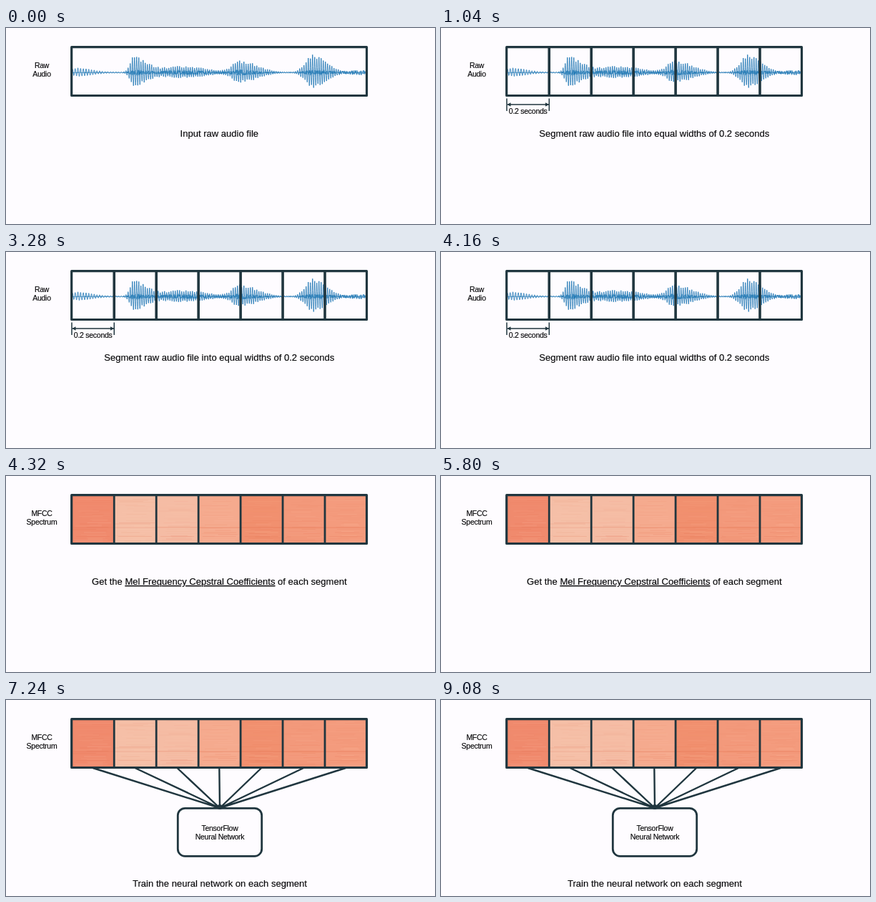
These frames come from a looping animation (600 px wide and 274 px high, 9120 ms). An HTML page:

```html
<!DOCTYPE html>
<html lang="en">
<head>
<meta charset="utf-8">
<title>Audio to neural network</title>
<style>
  html, body { margin: 0; width: 100%; height: 100%; overflow: hidden; background: #fefcff; }
  svg { display: block; width: 600px; height: 274px; }
  text { font-family: "Liberation Sans", Arial, sans-serif; text-anchor: middle; fill: #08080a; stroke: #08080a; stroke-width: .15; }
  .label { font-size: 10.5px; letter-spacing: -.27px; }
  .caption { font-size: 13.05px; }
  .under { text-decoration: underline; }
  .line { fill: none; stroke: #20363f; }
  .wave { fill: none; stroke: #1f77b4; stroke-linejoin: round; }
</style>
</head>
<body>
<svg viewBox="0 0 600 274">
  <g data-from="0" data-to="4320">
    <path id="tone" class="wave" stroke-width=".85"/>
    <path id="hiss" class="wave" stroke-width=".6"/>
    <text class="label" x="50" y="55.5">Raw</text>
    <text class="label" x="50" y="67.5">Audio</text>
  </g>
  <text class="caption" x="298.3" y="152" data-from="0" data-to="1040">Input raw audio file</text>
  <g data-from="1040" data-to="4320">
    <path class="line dividers" stroke-width="3.6"/>
    <path class="line" stroke-width="1.5" d="M92 98.5V116M151.3 98.5V116M93 107H150.5"/>
    <path fill="#20363f" d="M92.5 107l5-2.7v5.4zM151 107l-5-2.7v5.4z"/>
    <text class="label" x="121.7" y="120.3">0.2 seconds</text>
    <text class="caption" x="298.3" y="152">Segment raw audio file into equal widths of 0.2 seconds</text>
  </g>
  <g data-from="4320" data-to="9120">
    <g id="spectrum"></g>
    <path class="line dividers" stroke-width="2.8"/>
    <text class="label" x="50" y="55.5">MFCC</text>
    <text class="label" x="50" y="67.5">Spectrum</text>
  </g>
  <text class="caption" x="298.3" y="152" data-from="4320" data-to="7240">Get the <tspan class="under">Mel Frequency Cepstral Coefficients</tspan> of each segment</text>
  <g data-from="7240" data-to="9120">
    <path id="links" class="line" stroke-width="2.4"/>
    <circle cx="299" cy="149.5" r="3.6" fill="#20363f"/>
    <rect class="line" x="240.3" y="151.3" width="117.4" height="67" rx="10" stroke-width="2.8"/>
    <text class="label" x="299" y="182.5">TensorFlow</text>
    <text class="label" x="299" y="194.5">Neural Network</text>
    <text class="caption" x="299" y="260.5">Train the neural network on each segment</text>
  </g>
  <rect class="line" x="91.7" y="26.7" width="412.8" height="67.8" stroke-width="3.2" stroke-linejoin="round"/>
</svg>
<script>
const LOOP = 9120, LEFT = 92, RIGHT = 504, TOP = 27, BOTTOM = 94;
const COUNT = 7, CELL = 58.95, AXIS = 62.3;
const $ = s => document.querySelector(s);
const $$ = s => [...document.querySelectorAll(s)];

function rng(seed) {
  return () => (seed = (seed * 16807) % 2147483647) / 2147483647;
}

// Each burst of sound is a bell with its own rise and fall.
const BURSTS = [
  { at: 92, rise: 1, fall: 26, size: 6, hiss: 0 },
  { at: 178, rise: 5, fall: 18, size: 22, hiss: 3.2 },
  { at: 243, rise: 24, fall: 38, size: 8, hiss: 3 },
  { at: 326, rise: 9, fall: 24, size: 16, hiss: 3.2 },
  { at: 430, rise: 11, fall: 18, size: 24, hiss: 3.2 },
  { at: 498, rise: 20, fall: 20, size: 1, hiss: 3 }
];

function level(x, key) {
  return BURSTS.reduce((sum, b) => {
    const d = (x - b.at) / (x < b.at ? b.rise : b.fall);
    return sum + b[key] * Math.exp(-d * d / 2);
  }, .6);
}

function trace(id, step, height) {
  const pts = [];
  for (let x = LEFT; x < RIGHT; x += step) {
    pts.push(x.toFixed(2) + " " + (AXIS - height(x)).toFixed(1));
  }
  $(id).setAttribute("d", "M" + pts.join("L"));
}

function drawWave() {
  const rand = rng(41);
  let cycle = -1, gain = 1;
  trace("#tone", .25, x => {
    const turns = (x - LEFT) / (x < 165 ? 3.8 : 3);
    if (Math.floor(turns) !== cycle) {
      cycle = Math.floor(turns);
      gain = .75 + .3 * rand();
    }
    const s = Math.sin(turns * 2 * Math.PI);
    const peak = s * Math.sqrt(Math.abs(s)) * (s > 0 ? 1 : .84);
    return peak * gain * level(x, "size");
  });
  trace("#hiss", .3, x => (rand() * 2 - 1) * Math.min(4, level(x, "hiss")));
}

function addRect(x, y, width, height, fill, opacity = 1) {
  const r = document.createElementNS("http://www.w3.org/2000/svg", "rect");
  const attrs = { x, y, width, height, fill, opacity };
  for (const k in attrs) r.setAttribute(k, attrs[k]);
  $("#spectrum").append(r);
}

function drawSpectrum() {
  const tones = ["#f08a6d", "#f5bfa7", "#f5bca4", "#f5aa8e", "#f1906f", "#f3997b", "#f49b7d"];
  const rand = rng(77);
  tones.forEach((tone, i) => {
    const x = LEFT + i * CELL;
    addRect(x, TOP, CELL, BOTTOM - TOP, tone);
    for (let y = TOP + 2; y < BOTTOM - 1; y += 1.5) {
      const start = rand() * CELL * .5;
      const w = (CELL - start) * (.5 + rand() * .5);
      const streak = rand() < .5 ? "#d95f3f" : "#fbd0bb";
      addRect(x + start, y, w, 1, streak, rand() * (y > 64 ? .16 : .09));
    }
    addRect(x, 71.5, CELL, 1.2, "#d95f3f", i > 2 ? .28 : .14);
    addRect(x + 6, 84, CELL - 12, 1, "#d95f3f", .16);
  });
}

function drawLines() {
  let dividers = "", links = "";
  for (let i = 0; i < COUNT; i++) {
    const x = LEFT + i * CELL;
    if (i) dividers += `M${x + .3} ${TOP}V${BOTTOM}`;
    links += `M${x + CELL / 2} 95L299 151`;
  }
  $$(".dividers").forEach(p => p.setAttribute("d", dividers));
  $("#links").setAttribute("d", links);
}

drawWave();
drawSpectrum();
drawLines();

const scenes = $$("[data-from]").map(el => ({ el, from: +el.dataset.from, to: +el.dataset.to }));
const begin = performance.now();

function frame() {
  const t = (performance.now() - begin) % LOOP;
  for (const { el, from, to } of scenes) {
    el.style.display = t >= from && t < to ? "" : "none";
  }
  requestAnimationFrame(frame);
}
frame();
</script>
</body>
</html>
```
